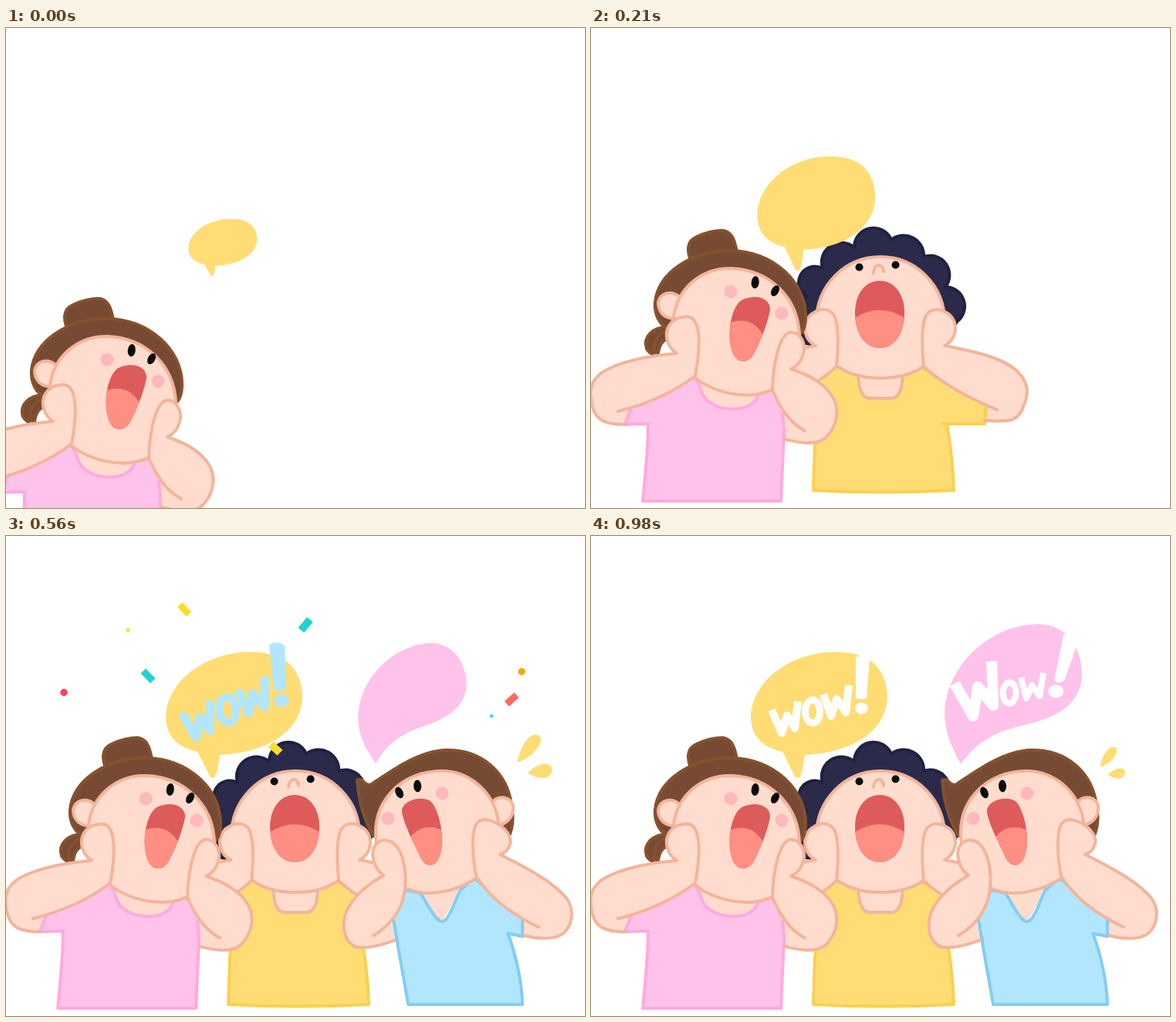
An HTML page that plays this animation: 750 px wide and 621 px high, repeating every 1350 ms.

```html
<!DOCTYPE html>
<html lang="en">
<head>
<meta charset="utf-8">
<title>Wow!</title>
<style>
  html, body { margin: 0; width: 100%; height: 100%; overflow: hidden; background: #fff; }
  svg { display: block; width: 100%; height: 100%; }
  path, ellipse, circle { stroke-width: 4; stroke-linecap: round; stroke-linejoin: round; }
  .skin { fill: #ffdccd; }
  .line { stroke: #f2b59b; }
  .none { fill: none; }
  .brown { fill: #774a34; stroke: #85522e; }
  .navy { fill: #2b2a4a; stroke: #1f2140; }
  .pink { fill: #ffc2ea; stroke: #ffaade; }
  .yellow { fill: #ffdd74; stroke: #fbd04e; }
  .blue { fill: #b2e6ff; stroke: #82cdf3; }
  .eye { fill: #0b0b0b; }
  .cheek { fill: #ffb8bb; }
  .mouth { fill: #de5b5b; }
  .tongue { fill: #ff8f82; }
  .brush path { fill: none; stroke: currentColor; stroke-linecap: butt; }
  .brush .dot { fill: currentColor; stroke: none; }
</style>
</head>
<body>
<svg id="stage" viewBox="0 0 750 621"></svg>
<script>
const stage = document.getElementById('stage');

const path = (cls, d) => `<path class="${cls}" d="${d}"/>`;
const oval = (cls, x, y, rx, ry = rx, turn = 0) =>
  `<ellipse class="${cls}" cx="${x}" cy="${y}" rx="${rx}" ry="${ry}" transform="rotate(${turn} ${x} ${y})"/>`;
const group = (id, body, attrs = '') => `<g id="${id}" ${attrs}>${body}</g>`;

// Arm: filled shape, sleeve edge on top of it, then the outline.
const arm = (outer, back, inner, color, edge) =>
  path('skin', outer + back + 'Z') + path(color + ' none', edge) +
  path('line none', outer + inner);

const mouth = (id, shape, tongue) =>
  `<clipPath id="${id}"><path d="${shape}"/></clipPath>` + path('mouth', shape) +
  `<g clip-path="url(#${id})">${path('tongue', tongue)}</g>`;

const girl =
  path('brown', 'M128 297C124 284 125 274 137 269C148 264 160 261 170 261C182 262 186 272 189 289Z') +
  path('brown', 'M100 386C80 385 67 399 72 414Q75 419 80 421Q80 416 82 414Q82 420 87 421C88 410 92 403 100 401Z') +
  path('brown none', 'M82 414C80 404 88 393 98 391') +
  path('skin', 'M138 440H220L217 472Q212 492 184 492Q145 490 140 456Z') +
  path('pink', 'M44 512L56 478L134 451Q139 456 142 466C146 484 165 492 184 492C203 492 215 484 217 471L233 466C245 482 250 500 250 520L246 611H67C70 580 74 545 74 511Z') +
  path('brown', 'M104 388C88 386 82 368 83 354C87 316 130 287 180 287C236 288 278 327 278 372C278 385 274 396 268 396Z') +
  path('skin line', 'M115 347C104 338 90 341 87 354C87 367 95 374 107 375') +
  path('skin line', 'M107 373C112 335 144 309 182 310C232 312 268 348 270 396C272 440 250 473 202 474C165 473 140 458 128 445C112 425 105 400 107 373Z') +
  oval('cheek', 181, 340, 8.5) + oval('cheek', 247, 368, 8.5) +
  oval('eye', 212.7, 328, 5, 8, 6) + oval('eye', 238.5, 339, 4.8, 7.6, 28) +
  mouth('m1', 'M204 348C220 344 233 352 232 364C228 385 216 412 210 422C204 432 192 433 186 424C176 408 178 372 190 356C194 351 198 349 204 348Z',
    'M176 382C195 373 212 377 223 396V440H170Z') +
  arm('M135 449C140 425 141 400 138 388C135 374 128 371 119 373C102 375 95 390 99 404C101 411 105 416 111 420C75 423 40 430 17 443C-2 455-3 470 2 489C6 506 18 512 44 512',
    'L53 490C82 483 112 467 135 449', 'M135 449C110 468 75 485 35 495', 'pink', 'M44 512L52 491') +
  arm('M235 467C236 432 244 397 257 393C270 391 277 405 276 416C274 428 268 436 259 440C285 449 305 460 315 480C324 500 314 520 303 530C288 540 268 535 251 531',
    'L250 505C244 490 238 478 235 467', 'M235 467C245 492 258 510 277 520', 'pink', 'M248 498Q250 510 250 531');

const curlyArm = arm('M431 446C428 415 429 390 434 380C440 370 452 371 460 376C470 381 474 393 471 403C469 411 464 416 458 419C500 427 535 435 553 453C570 470 566 485 558 503C550 518 540 517 511 516',
  'L512 496C484 484 455 468 431 446', 'M431 446C455 468 490 487 526 502', 'yellow', 'M512 498L510 520');

const curly =
  path('navy', 'M290 418L278 416A24 24 0 0 1 280 356A20.5 20.5 0 0 1 300 319A25.5 25.5 0 0 1 341 292A25 25 0 0 1 389 282A26 26 0 0 1 431 304A25 25 0 0 1 459 343A25 25 0 0 1 474 388L460 410Z') +
  path('yellow', 'M318 446L237 496L239 520H293L290 545L288 606Q375 611 470 606C469 580 467 555 461 520H455H510L512 496L430 448Z') +
  path('skin line', 'M346 455C347 474 350 487 362 487H388C400 487 403 475 404 455') +
  path('skin line', 'M292 388C292 341 329 304 375 304S458 341 458 388C458 435 425 461 375 461S292 435 292 388Z') +
  oval('eye', 347.5, 317.5, 5) + oval('eye', 394.5, 314.5, 5) +
  path('line none', 'M366 325C366 312 379 312 379 323') +
  mouth('m2', 'M374 335C394 335 406 354 406 376C406 402 394 422 374 422C354 422 342 402 342 376C342 354 354 335 374 335Z',
    'M340 384Q374 362 408 384V430H340Z') +
  curlyArm + `<g transform="translate(749 0) scale(-1 1)">${curlyArm}</g>`;

const boy =
  path('skin', 'M530 440H600L588 459L565 499L537 462Z') +
  path('blue', 'M501 493L518 458L537 462C545 475 552 490 560 497Q565 501 570 496C577 488 582 472 588 459L606 442L669 494V518L650 514C660 540 668 575 669 606H521Z') +
  path('brown', 'M476 388C464 368 457 345 455 316C462 312 464 323 472 322C500 303 535 278 570 277C615 276 650 305 655 350C658 365 656 380 650 392Z') +
  path('skin line', 'M629 345C638 334 655 337 657 350C658 364 648 373 637 374') +
  path('skin line', 'M479 390C476 340 515 304 564 304C602 304 630 332 637 364C645 405 620 440 600 448C582 458 562 462 545 462C505 460 481 430 479 390Z') +
  oval('cheek', 495, 365.5, 8.5) + oval('cheek', 565, 333, 8.5) +
  oval('eye', 509.5, 332, 4.8, 7.6, -24) + oval('eye', 533, 323.5, 5, 8, -3) +
  mouth('m3', 'M541 340C526 338 511 347 513 358C516 375 530 400 537 416C542 427 552 429 558 421C568 410 567 375 556 352C552 343 548 341 541 340Z',
    'M522 392C535 374 552 373 570 383V440H520Z') +
  arm('M517 452C519 430 513 404 500 396C486 389 475 398 475 412C476 425 482 434 489 439C465 453 445 470 439 492C435 510 440 528 455 532C470 534 488 529 504 523',
    'L501 493C510 482 515 468 517 452', 'M517 452C516 480 500 502 476 517', 'blue', 'M502 497L507 524') +
  arm('M609 440C603 410 604 385 608 375C613 365 622 366 630 369C648 376 655 390 653 398C651 406 647 410 640 412C680 432 712 450 727 470C737 486 733 504 722 514C710 523 692 522 671 517',
    'L669 496C645 483 622 463 609 440', 'M609 440C628 470 660 492 690 506', 'blue', 'M669 498V518');

const stroke = (width, d) => `<path d="${d}" style="stroke-width:${width}"/>`;
const ring = (x, y, rx, ry) => `M${x} ${y - ry}a${rx} ${ry} 0 1 0 .1 0Z`;

const word1 =
  stroke(10, 'M234 225L247 255L254 232L264 249L268 214') +
  stroke(9, ring(287, 227, 9.5, 15)) +
  stroke(10, 'M301 205L311 233L318 211L330 228L334 193') +
  path('dot', 'M343 157Q352 152 361 160L357 210Q350 212 343 210Z') +
  oval('dot', 350.5, 223, 8.5, 7.5);

const word2 =
  stroke(14, 'M471 191L495 233L501 195L521 219L519 162') +
  stroke(8, ring(542, 203, 8.5, 13.5)) +
  stroke(8, 'M557 183L564 210L571 193L581 207L586 177') +
  path('dot', 'M612 128Q622 121 630 140L613 187Q606 192 600 187Z') +
  oval('dot', 602, 201, 10, 8.5);

// x, y, width, height, turn, colour; round pieces have no turn
const pieces = [
  [231, 95, 17, 9, 47, '#ffdb2e'], [349, 275, 16, 10, 43, '#ffdb2e'],
  [388, 115, 18, 10, -50, '#1fd2d2'], [184, 181, 18, 9, 46, '#1fd2d2'],
  [655, 211.5, 17, 9, -42, '#ff6a60'], [75, 202.5, 9.5, 9.5, 0, '#ff4255'],
  [668, 175.5, 9.5, 9.5, 0, '#ffa60c'], [158, 122, 5, 5, 0, '#ffdb2e'],
  [629, 233, 5, 5, 0, '#53dcea']
];
const confetti = pieces.map(([x, y, w, h, turn, color]) =>
  `<rect x="${-w / 2}" y="${-h / 2}" width="${w}" height="${h}" rx="${turn ? 0 : w / 2}"
    fill="${color}" transform="translate(${x} ${y}) rotate(${turn})"/>`).join('');

const sparks =
  path('', 'M659 299C662 285 668 274 676 273C684 273 682 281 677 287C672 293 666 297 659 299Z') +
  path('', 'M669 309C676 302 684 299 689 301C694 304 692 311 687 313C681 315 675 312 669 309Z');

stage.innerHTML =
  group('curly', curly) + group('girl', girl) + group('boy', boy) +
  group('bubble1', path('', 'M248 279C223 274 207 259 207 234C208 188 258 150 317 150C362 150 383 172 384 208C383 252 338 281 277 283C275 295 274 305 271 311Q268 315 264 311Z'), 'fill="#ffdd74"') +
  group('bubble2', path('', 'M479 295C466 272 458 252 458 228C460 170 515 114 580 114C617 115 636 145 636 180C634 220 600 236 560 245C520 253 497 270 479 295Z'), 'fill="#ffc2ea"') +
  group('word1', word1, 'class="brush" role="img" aria-label="WOW!"') +
  group('word2', word2, 'class="brush" role="img" aria-label="Wow!" color="#fff"') +
  group('sparks', sparks, 'fill="#ffdd74"') + group('confetti', confetti);

// Keys are [time, ...values].
const tracks = {
  girl: [[0, -50, 89], [70, -8, 0], [140, 0, -9], [210, 0, 1], [280, 0, 0]],
  curly: [[70, 0, 380], [140, 0, 84.5], [210, 0, -8], [280, 0, -6], [350, 0, -1], [420, 0, 0]],
  boy: [[210, 40, 400], [280, 30, 260], [350, 6, 53], [420, -1, -6], [490, 0, -4], [560, 0, 0]],
  bubble1: [[0, 267, 321, .503, .454], [140, 268, 314, .678, .7], [210, 268, 314, .864, .908], [350, 268, 313, .944, .945], [560, 268, 313, 1, 1]],
  bubble2: [[280, 488, 314, 0, -12], [350, 486, 310, .335, -10], [560, 479, 294, .815, -6], [700, 479, 294, .995, -1], [770, 479, 295, 1, 0]],
  word1: [[350, 291, 224, 1.61, -8], [560, 287, 225, 1.115, -6], [700, 287, 227, 1, 0]],
  word2: [[630, 524, 199, 1.6, 20], [700, 529, 200, 1.4, 17], [840, 538, 202, 1.12, 6], [980, 542, 203, 1, 0]],
  sparks: [[490, .8], [560, 1.38], [700, 1]],
  confetti: [[490, .7], [560, 1]]
};

function sample(keys, t) {
  const next = keys.findIndex(key => key[0] > t);
  if (next === 0) return keys[0].slice(1);
  if (next < 0) return keys[keys.length - 1].slice(1);
  const a = keys[next - 1], b = keys[next];
  const k = (t - a[0]) / (b[0] - a[0]);
  return a.slice(1).map((v, i) => v + (b[i + 1] - v) * k);
}

const el = id => document.getElementById(id);
const place = (id, transform) => el(id).setAttribute('transform', transform);
const show = (id, on) => el(id).setAttribute('display', on ? 'inline' : 'none');
const zoom = (x, y, sx, sy, px, py) =>
  `translate(${x} ${y}) scale(${sx} ${sy}) translate(${-px} ${-py})`;
const spin = (x, y, size, turn, px, py) =>
  `translate(${x} ${y}) rotate(${turn}) scale(${size}) translate(${-px} ${-py})`;

const LOOP = 1350, STEP = 70, LAST = 980;

function draw(time) {
  const t = Math.min(LAST, Math.floor((time % LOOP) / STEP) * STEP);
  const at = id => sample(tracks[id], t);

  for (const id of ['girl', 'curly', 'boy']) place(id, `translate(${at(id)})`);
  place('bubble1', zoom(...at('bubble1'), 268, 313));
  place('bubble2', spin(...at('bubble2'), 479, 295));
  place('word1', spin(...at('word1'), 287, 227));
  place('word2', spin(...at('word2'), 542, 203));
  el('word1').setAttribute('color', t < 490 ? '#ffc2ea' : t < 630 ? '#b2e6ff' : '#fff');

  const [spark] = at('sparks'), [spread] = at('confetti');
  place('sparks', zoom(651, 315, spark, spark, 651, 315));
  place('confetti', zoom(375, 250, spread, spread, 375, 250));

  show('bubble2', t >= 350);
  show('word1', t >= 350);
  show('word2', t >= 630);
  show('sparks', t >= 490);
  show('confetti', t >= 490 && t < 630);
}

const start = performance.now();
function tick() {
  draw(performance.now() - start);
  requestAnimationFrame(tick);
}
tick();
</script>
</body>
</html>
```
